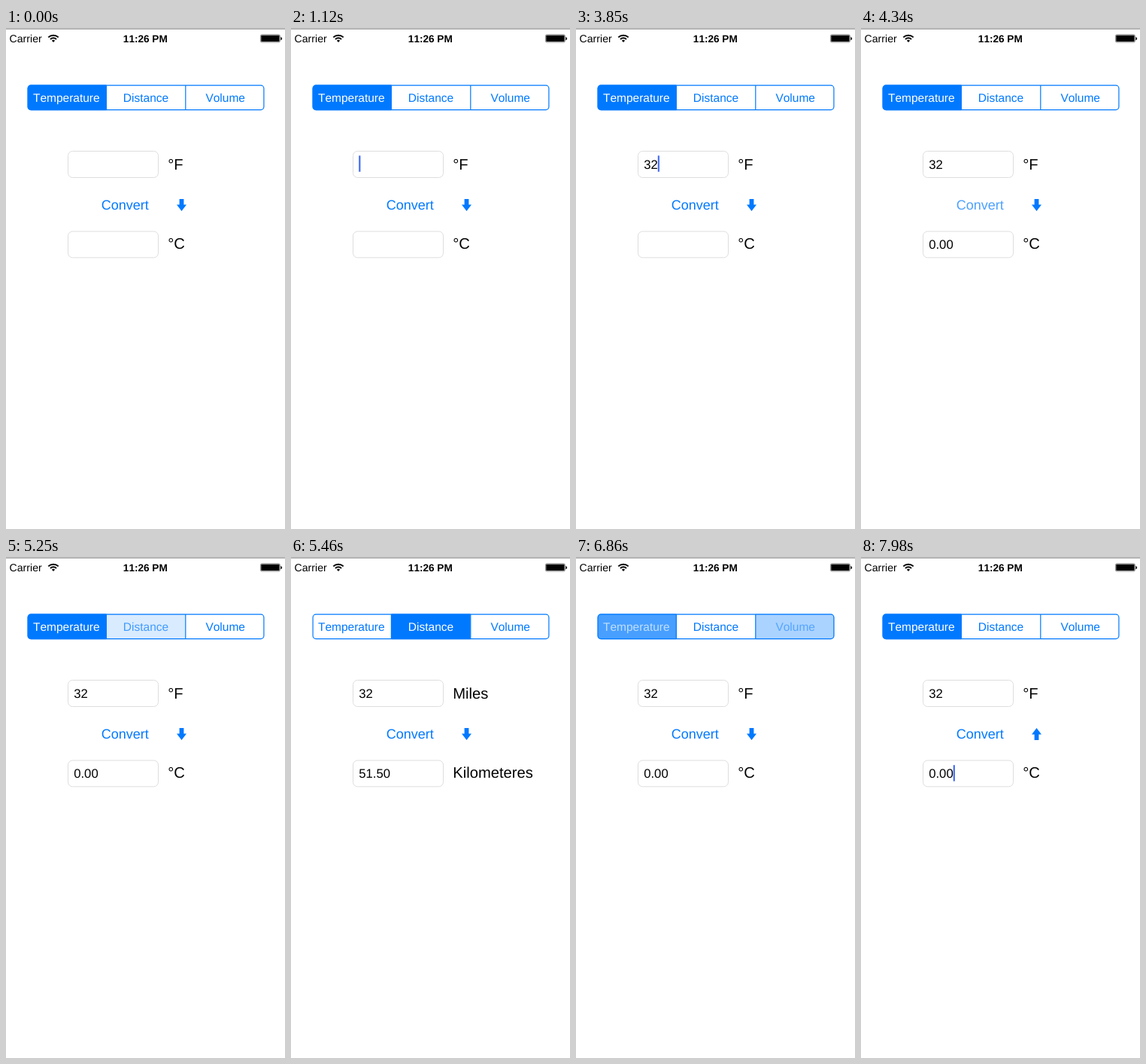
Recreate the animation shown at these times as an HTML page. Size 371 by 665 pixels, loop 8 s.

```html
<!DOCTYPE html>
<html lang="en">
<head>
<meta charset="utf-8">
<title>Unit converter</title>
<style>
  html, body { margin: 0; width: 100%; height: 100%; overflow: hidden; background: #fff; }
  svg { display: block; font-family: "Liberation Sans", Arial, sans-serif; font-kerning: none; text-rendering: geometricPrecision; }
  .tab { font-size: 15.5px; text-anchor: middle; }
  .unit { font-size: 20.2px; }
  .value { font-size: 16.7px; }
  .field { fill: #fff; stroke: #dedede; }
  .blue { fill: #0079ff; }
</style>
</head>
<body>
<svg width="371" height="665" viewBox="0 0 371 665">
  <rect y="0.5" width="371" height="1.2" fill="#808080"/>

  <text x="4.6" y="18.8" font-size="14.1">Carrier</text>
  <g fill="none" stroke="#000" stroke-width="2">
    <path d="M56.3 12.4 A9.6 9.6 0 0 1 69.7 12.4"/>
    <path d="M59 15 A5.7 5.7 0 0 1 67 15"/>
  </g>
  <path d="M60.9 16.8 A3 3 0 0 1 65.1 16.8 L63 19 Z"/>
  <text x="185.3" y="18.8" font-size="13.6" font-weight="bold" text-anchor="middle">11:26 PM</text>
  <rect x="338.4" y="8.8" width="26" height="10.2" rx="1.8" fill="#ddd" stroke="#777" stroke-width="0.8"/>
  <rect x="339.3" y="9.7" width="24.2" height="8.4" rx="0.8"/>
  <path d="M365.4 12 Q367.2 12.4 367.2 14.1 T365.4 16.2 Z"/>

  <clipPath id="tabShape"><rect x="28.5" y="75.6" width="315" height="33.6" rx="4.6"/></clipPath>
  <g id="tabs" clip-path="url(#tabShape)"></g>
  <g fill="none" stroke="#0079ff" stroke-width="1.2">
    <rect x="29.1" y="76.2" width="313.8" height="32.4" rx="4"/>
    <path d="M133.4 76V109M238.8 76V109"/>
  </g>

  <rect class="field" x="82.5" y="163.5" width="120" height="35" rx="6"/>
  <rect class="field" x="82.5" y="270" width="120" height="34.8" rx="6"/>
  <text id="input" class="value" x="90.2" y="186.8"></text>
  <text id="output" class="value" x="90.2" y="293.1"></text>
  <text id="fromUnit" class="unit" x="215.3" y="187.5"></text>
  <text id="toUnit" class="unit" x="215.3" y="293"></text>
  <rect id="cursor" width="2.2" height="21.4" fill="#426bf2"/>

  <text id="convert" class="blue" x="126.8" y="241.2" font-size="18">Convert</text>
  <path id="downArrow" class="blue" d="M230.6 227H236.4V234.4H240L233.5 243L227 234.4H230.6Z"/>
  <path id="upArrow" class="blue" d="M230.6 243H236.4V235.6H240L233.5 227L227 235.6H230.6Z"/>
</svg>
<script>
const LOOP = 8000, STEP = 70;
const $ = id => document.getElementById(id);

const modes = [
  { name: "Temperature", from: "°F", to: "°C", result: "0.00" },
  { name: "Distance", from: "Miles", to: "Kilometeres", result: "51.50" },
  { name: "Volume", from: "Gallons", to: "Liters", result: "121.13" }
];
const switches = [[5250, 0, 1], [5950, 1, 2], [6790, 2, 0]];

// Each row: start time, then the values of successive steps; the last one holds.
const cursorTrack = [
  [0, 0], [1050, 1], [1680, .85, .55, .25, 0], [2170, .5, 1], [3010, .5, 0],
  [3220, 1], [3850, .95, .65, .3, 0], [7630, 1]
];
const convertTrack = [[0, 1], [4130, .2, .3, .5, .7, .88, 1]];
const inputTrack = [[0, ""], [3220, "3", "32"]];
const arrowTrack = [[0, 0], [7630, .1, .3, .5, .7, .9, 1]];
const fadeTrack = [[0, 0, .67, .93, 1]];

function sample(track, t) {
  const [start, ...values] = track.findLast(row => row[0] <= t);
  return values[Math.min(values.length - 1, Math.floor((t - start) / STEP))];
}

const mix = (a, b, p) => a + (b - a) * p;
const whiten = p => `rgb(${mix(0, 255, p)},${mix(121, 255, p)},255)`;

$("tabs").innerHTML = modes.map((mode, i) =>
  `<rect x="${28.3 + 105.2 * i}" y="75" width="105.2" height="35"/>
   <text class="tab" x="${80.3 + 105.7 * i}" y="97.5">${mode.name}</text>`).join("");
const tabFills = $("tabs").querySelectorAll("rect");
const tabTexts = $("tabs").querySelectorAll("text");

function drawTabs(t) {
  const [start, from, to] = switches.findLast(row => row[0] <= t) || [0, 0, 0];
  const p = from === to ? 1 : sample(fadeTrack, t - start);
  modes.forEach((mode, i) => {
    const fill = i === to ? mix(.15, 1, p) : i === from ? 1 - p : 0;
    const text = i === to ? mix(.25, 1, p) : fill;
    tabFills[i].setAttribute("fill", whiten(1 - fill));
    tabTexts[i].setAttribute("fill", whiten(text));
  });
  return modes[p > 0 ? to : from];
}

function draw(time) {
  const t = Math.floor(time % LOOP / STEP) * STEP;
  const mode = drawTabs(t);
  $("input").textContent = sample(inputTrack, t);
  $("output").textContent = t < 4200 ? "" : mode.result;
  $("fromUnit").textContent = mode.from;
  $("toUnit").textContent = mode.to;

  const lower = t >= 7630;
  const active = $(lower ? "output" : "input");
  const textWidth = active.textContent ? active.getComputedTextLength() : 0;
  $("cursor").setAttribute("x", 90.2 + textWidth);
  $("cursor").setAttribute("y", lower ? 276.2 : 169.4);
  $("cursor").setAttribute("opacity", sample(cursorTrack, t));

  const flip = sample(arrowTrack, t);
  $("convert").setAttribute("opacity", sample(convertTrack, t));
  $("downArrow").setAttribute("opacity", 1 - flip);
  $("upArrow").setAttribute("opacity", flip);
}

const begin = performance.now();
function tick() {
  draw(performance.now() - begin);
  requestAnimationFrame(tick);
}
tick();
</script>
</body>
</html>
```
